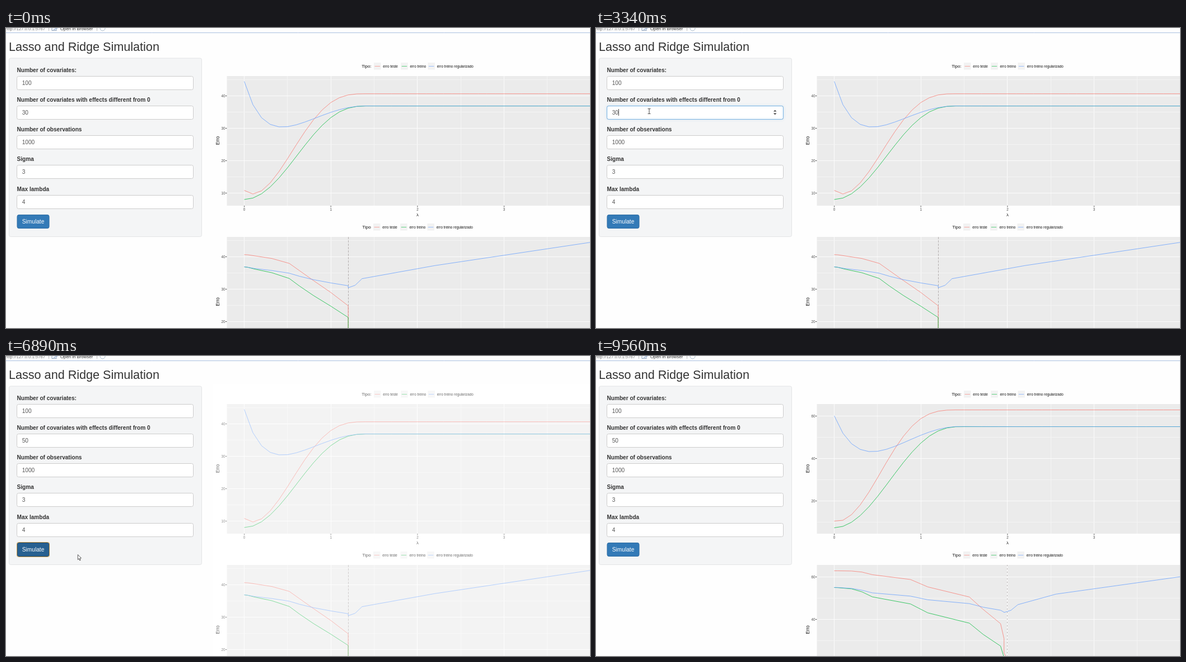
These frames come from a looping animation (1043x537 px, 9.72 s). An HTML page with a canvas:

```html
<!DOCTYPE html>
<html lang="en">
<head>
<meta charset="utf-8">
<title>Lasso and Ridge Simulation</title>
<style>
  html, body { margin: 0; width: 100%; height: 100%; overflow: hidden; background: #fefefe; }
  canvas { display: block; }
</style>
</head>
<body>
<canvas id="stage" width="1043" height="537"></canvas>
<script>
const ctx = document.getElementById('stage').getContext('2d');
const LOOP = 9720;
const FONT = '"Liberation Sans", Arial, sans-serif';
const LEFT = 394.5, X0 = 425.5, UNIT = 154.7, LOWER = 288;
const SERIES = [['erro teste', '#f8766d'], ['erro treino', '#00ba38'], ['erro treino regularizado', '#619cff']];

// curves, per series: plateau height, drop below it, steepness, overfit lift at lambda 0, its decay
// selected: covariates still in the model at lambda = 0, 0.1, 0.2 ...
const before = {
  effects: 30, end: 1.4, tickStep: 10, zero: 353, scale: 5.8, dash: [4, 2],
  curves: [[117.7, 192, 1.5, 19, 7.5], [139.6, 167.4, 1.25, 0, 1], [139.6, 64, 1, 108, 5]],
  selected: [100, 55, 34, 32, 30, 30, 30, 25, 20, 16, 13, 8, 3, 1]
};
const after = {
  effects: 50, end: 1.45, tickStep: 20, zero: 335, scale: 3.8, dash: [2, 4],
  curves: [[96.5, 207, 1.7, 8, 4], [126.5, 181, 1.2, 0, 1], [126.5, 78, 1, 97.5, 4]],
  selected: [100, 64, 53, 51, 49, 49, 48, 43, 39, 27, 22, 11, 8, 5, 1]
};

// Pointer moves: first step, last step, target x, target y
const moves = [
  [1550, 1700, 635, 403],
  [1940, 2170, 169, 191],
  [2400, 3020, 95, 149],
  [5600, 5920, 44, 346],
  [6790, 7400, 229, 366],
  [8320, 8480, 696, 462],
  [8630, 8800, 961, 526],
  [8950, 9100, 985, 540]
];

const ramp = (t, a, b) => Math.min(1, Math.max(0, (t - a) / (b - a)));

function text(str, x, y, size, color, align = 'left', weight = '') {
  ctx.font = `${weight} ${size}px ${FONT}`;
  ctx.textAlign = align;
  ctx.fillStyle = color;
  ctx.fillText(str, x, y);
}
function rect(x, y, w, h, color) {
  ctx.fillStyle = color;
  ctx.fillRect(x, y, w, h);
}
function box(x, y, w, h, fill, stroke) {
  ctx.beginPath();
  ctx.roundRect(x, y, w, h, 3);
  ctx.fillStyle = fill;
  ctx.fill();
  ctx.strokeStyle = stroke;
  ctx.lineWidth = 1;
  ctx.stroke();
}
function trace(points) {
  ctx.beginPath();
  for (let i = 0; i < points.length; i += 2) ctx.lineTo(points[i], points[i + 1]);
}
function line(points, color, width = 1) {
  trace(points);
  ctx.strokeStyle = color;
  ctx.lineWidth = width;
  ctx.stroke();
}
function shape(points, fill, stroke = fill) {
  trace(points);
  ctx.closePath();
  ctx.fillStyle = fill;
  ctx.fill();
  ctx.strokeStyle = stroke;
  ctx.lineWidth = stroke === fill ? 0.1 : 0.9;
  ctx.stroke();
}

function pointerAt(t) {
  let x = 1036, y = 530;
  for (const [start, end, tx, ty] of moves) {
    if (t < start) break;
    const last = Math.round((end - start) / 76);
    const step = Math.floor(ramp(t, start, end) * last + 1e-6) + 1;
    const p = 1 - (1 - step / (last + 1)) ** 2.4;
    x += (tx - x) * p;
    y += (ty - y) * p;
  }
  return { x, y };
}

function legend(x, y, title) {
  text(title, 644, y + 3, 8.1, '#111', 'center');
  SERIES.forEach(([name, color], i) => {
    const key = x + i * 48.2;
    rect(key, y - 6, 12.5, 12.5, '#f2f2f2');
    line([key + 1.5, y + 0.5, key + 11, y + 0.5], color, 0.6);
    text(name, key + 16.3, y + 2.5, 6.29, '#111');
  });
}

function panel(data, top, height, dy) {
  rect(LEFT, top, 649, height, '#ebebeb');
  for (let k = 0; k < 8; k++) {
    const x = Math.round(X0 + k * UNIT / 2 - 0.5) + 0.5;
    line([x, top, x, top + height], k % 2 ? '#f4f4f4' : '#fcfcfc');
  }
  for (let k = 1; k < 10; k++) {
    const value = k * data.tickStep / 2;
    const y = data.zero - data.scale * value + dy + 0.5;
    if (y < top || y > top + height) continue;
    line([LEFT, y, 1043, y], k % 2 ? '#f4f4f4' : '#fcfcfc');
    if (k % 2) continue;
    text(value, 391.5, y + 2.3, 6.3, '#4d4d4d', 'right');
    line([392, y, LEFT, y], '#555');
  }
  ctx.save();
  ctx.translate(381, dy ? 490 : 201.5);
  ctx.rotate(-Math.PI / 2);
  text('Erro', 0, 0, 8.2, '#111', 'center');
  ctx.restore();
}

function errorAt(lambda, end, [plateau, drop, power, lift, decay]) {
  const kept = (1 + Math.cos(Math.PI * Math.min(1, lambda / end))) / 2;
  return plateau + drop * kept ** power - lift * Math.exp(-decay * lambda);
}

function drawCurves(data, xAt, dy) {
  data.curves.forEach((curve, s) => {
    const points = [];
    for (let i = 0; i <= 40; i++) points.push(xAt(i), errorAt(i / 10, data.end, curve) + dy);
    line(points, SERIES[s][1], 0.75);
  });
}

function plots(data) {
  legend(657, 68, 'Tipo:');
  panel(data, 86, 232, 0);
  drawCurves(data, i => X0 + i * UNIT / 10, 0);
  for (let k = 0; k < 4; k++) {
    const x = X0 + k * UNIT;
    line([x, 318, x, 320.5], '#555');
    text(k, x, 327, 6.3, '#4d4d4d', 'center');
  }
  text('λ', 735, 336.5, 8, '#222', 'center');

  legend(656, 356, 'Tipo');
  panel(data, 374, 163, LOWER);
  const countX = count => X0 + count * UNIT / 25;
  const cut = Math.floor(countX(data.effects)) + 0.5;
  ctx.setLineDash(data.dash);
  line([cut, 374, cut, 537], '#a59d9d', 0.75);
  ctx.setLineDash([]);
  drawCurves(data, i => countX(data.selected[i] ?? 0), LOWER);
}

function toolbar() {
  text('http://127.0.0.1:5767', -1, 4, 7.75, '#777');
  line([76.5, 0, 76.5, 5], '#bbb');
  line([82, 0, 82, 4.5, 90, 4.5, 90, 2], '#8b9fb8');
  line([85, 3, 92, 0], '#6d8fc0');
  text('Open in Browser', 97, 4, 7.8, '#333');
  line([162.5, 0, 162.5, 5], '#bbb');
  ctx.beginPath();
  ctx.arc(172.5, 0.5, 4.5, 0, 7);
  ctx.strokeStyle = '#a9bccb';
  ctx.stroke();
  line([0, 8.5, 1043, 8.5], '#a9bfe0');
}

function effectsValue(t) {
  if (t < 3890) return '30';
  if (t < 4030) return '3';
  if (t < 4660) return '';
  return t < 4810 ? '5' : '50';
}

function form(t, hoverField, hoverButton) {
  box(5.5, 54, 344, 319.5, '#f4f5f6', '#e3e4e6');
  const value = effectsValue(t);
  const fields = [['Number of covariates:', '100'], ['Number of covariates with effects different from 0', value],
    ['Number of observations', '1000'], ['Sigma', '3'], ['Max lambda', '4']];
  fields.forEach(([label, content], i) => {
    const y = Math.floor(86 + i * 53.25);
    text(label, 19.5, y - 7, 10.08, '#333', 'left', 'bold');
    box(19.5, y + 0.5, 315, 24, '#fff', '#ccc');
    text(content, 28.7, y + 16, 10.08, '#555');
  });

  const focus = ramp(t, 3150, 3400) * (1 - ramp(t, 6330, 6460));
  ctx.save();
  ctx.globalAlpha = focus;
  ctx.shadowColor = 'rgba(102,175,233,.6)';
  ctx.shadowBlur = 4;
  box(19.5, 139.5, 315, 24, 'transparent', '#66afe9');
  ctx.restore();

  if ((t >= 3190 && t < 3750) || (t >= 4260 && t < 5360)) {
    rect(Math.floor(29 + value.length * 5.6), 145, 1, 12, '#444');
  }
  if (hoverField) {
    shape([317, 149.5, 319.7, 146.8, 322.4, 149.5], '#444');
    shape([317, 152.5, 319.7, 155.2, 322.4, 152.5], '#444');
  }

  const focused = t >= 6310 && t < 9560;
  const pressed = t >= 6310 && t < 6460;
  const fill = pressed ? '#204d74' : focused || hoverButton ? '#286090' : '#337ab7';
  box(20, 334.5, 57, 24, fill, focused || hoverButton ? '#204d74' : '#2e6da4');
  if (focused) box(19.5, 333.5, 58, 26, 'transparent', '#c99a4a');
  text('Simulate', 48.5, 350, 10.2, '#fff', 'center');
}

function pointer(x, y, kind) {
  ctx.save();
  ctx.beginPath();
  ctx.rect(0, 0, 1037, 537);
  ctx.clip();
  ctx.translate(x, y);
  if (kind === 'text') {
    line([0, -4, 0, 4.5], '#444');
    line([-2.5, -4.5, 2.5, -4.5], '#555');
    line([-2.5, 4.5, 2.5, 4.5], '#555');
  } else if (kind === 'hand') {
    shape([-1, 0, 0.5, -0.8, 1.5, 0, 1.5, 3.5, 5, 4.2, 6, 5.5, 5.8, 8, 4.5, 11, 0, 11, -3, 7, -2.5, 6, -1, 7], '#fff', '#222');
  } else {
    shape([0.5, 0.5, 0.5, 9.5, 2.5, 7.6, 4, 11, 5.3, 10.3, 4, 7, 6.6, 6.8], '#fff', '#444');
  }
  ctx.restore();
}

function draw(t) {
  rect(0, 0, 1043, 537, '#fefefe');
  const { x, y } = pointerAt(t);
  const hoverField = x > 19 && x < 335 && y > 139 && y < 163;
  const hoverButton = x > 19 && x < 78 && y > 334 && y < 359;

  toolbar();
  text('Lasso and Ridge Simulation', 5, 41, 21.6, '#333');
  plots(t < 7780 ? before : after);
  if (t < 7780) {
    const p = ramp(t, 6760, 7010);
    rect(370, 50, 673, 487, `rgba(254,254,254,${0.7 * p * p * (3 - 2 * p)})`);
  }
  form(t, hoverField, hoverButton);
  if (t >= 450 && t < 9100) pointer(x, y, hoverField ? 'text' : hoverButton ? 'hand' : 'arrow');
}

function tick() {
  draw(performance.now() % LOOP);
  requestAnimationFrame(tick);
}
tick();
</script>
</body>
</html>
```
